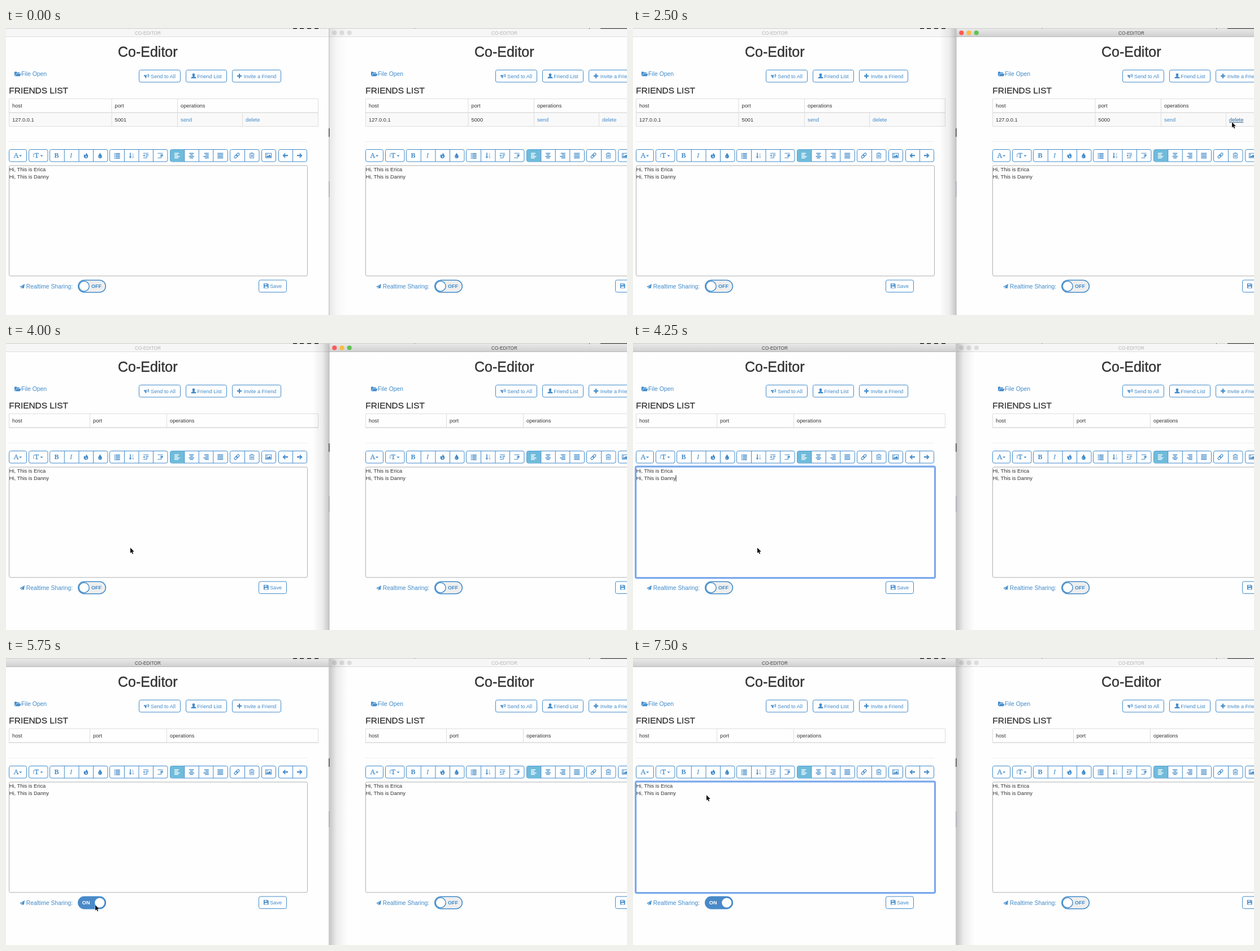
An HTML page for the animation above (8 s loop, 1099 by 509 pixels).

```html
<!DOCTYPE html>
<html lang="en">
<head>
<meta charset="utf-8">
<title>Shared editor</title>
<style>
  html, body { margin: 0; width: 100%; height: 100%; overflow: hidden; background: #fefefe; }
  svg { display: block; width: 1099px; height: 509px; font: 9.3px "Liberation Sans", Arial, sans-serif; }
  text { fill: #333; white-space: pre; }
  .blue { fill: #428bca; }
  .serif { font-family: "Liberation Serif", serif; fill: #428bca; }
  .line { fill: none; stroke: #428bca; }
</style>
</head>
<body>
<svg id="stage" viewBox="0 0 1099 509"></svg>
<script>
const LOOP = 8000, STEP = 250, SHIFT = 24, OFFSET = 631;
const BLUE = '#428bca';
const stage = document.getElementById('stage');

// Pointer stops: time, x, y
const pointer = [
  [500, 956, 145], [750, 964, 156], [1000, 976, 166], [1500, 969, 167],
  [1750, 994, 169], [2000, 1041, 168], [2250, 1060, 167],
  [3250, 930, 232], [3500, 620, 318], [3750, 310, 360], [4000, 220, 363],
  [4500, 214, 382], [4750, 184, 420], [5000, 160, 437], [5250, 158, 438],
  [6000, 151, 390], [6250, 135, 280], [6500, 130, 243]
];

const text = (x, y, s, attrs = '') => `<text x="${x}" y="${y}" ${attrs}>${s}</text>`;
const rect = (x, y, w, h, fill, attrs = '') =>
  `<rect x="${x}" y="${y}" width="${w}" height="${h}" fill="${fill}" ${attrs}/>`;
const path = (d, attrs = 'class="blue"') => `<path d="${d}" ${attrs}/>`;
const at = (x, y, body) => `<g transform="translate(${x} ${y})">${body}</g>`;
const dot = (x, y, r, fill, attrs = '') => `<circle cx="${x}" cy="${y}" r="${r}" fill="${fill}" ${attrs}/>`;
const frame = (x, y, w, h, r = 3) => rect(x, y, w, h, '#fefefe', `stroke="${BLUE}" rx="${r}"`);

// Four text lines; align: 0 left, .5 centre, 1 right
const bars = (widths, align, fill = BLUE) => widths.map((w, i) =>
  rect(-5 + (10 - w) * align, -4.6 + i * 2.7, w, 1.5, fill)).join('');
const caret = path('M0 0h5l-2.5 2.6z');
const arrow = path('M-5 0l4.2-4.2 1.2 1.2-1.9 1.9h6v2.2h-6l1.9 1.9-1.2 1.2z');
const dent = side => rect(-4.6, -4.5, 9.2, 1, BLUE) + rect(0, -1.8, 4.8, 1.4, BLUE) +
  rect(0, 1, 3.2, 1.4, BLUE) + rect(-4.6, 3.6, 7, 1, BLUE) +
  `<g transform="scale(${side} 1)">${path('M-5 0l3-2.2v4.4z')}</g>`;

const icon = {
  flame: path('M.2-5C2-3 4-1.3 3.8 1.3 3.6 3.6 2 5 0 5-2.4 5-3.9 3.3-3.9 1-3.9-.5-3-1.6-2.3-2.6c.1 1.2.3 1.8 1 2.3C-.8-1.8.7-3 .2-5z') +
    path('M.5 0c1 1.5 1.1 2.8-.2 4-1.3-.8-1.2-2 .2-4z', 'fill="#fefefe"'),
  drop: path('M0-5C1-2.4 3.4-.6 3.4 1.7 3.4 3.6 1.9 5 0 5s-3.4-1.4-3.4-3.3C-3.4-.6-1-2.4 0-5z') +
    path('M-1.5 1.5c0 1 .4 1.6 1.2 2', 'fill="none" stroke="#fefefe" stroke-width=".8"'),
  list: [-4.3, -1.6, 1.1, 3.8].map(y => rect(-5, y, 1.7, 1.6, BLUE) + rect(-2.5, y, 7.5, 1.6, BLUE)).join(''),
  order: path('M-3-5h1.5v7H0l-2.3 3L-4.6 2H-3z') +
    text(1, 0, '1', 'class="serif" font-size="6"') + text(1, 5, '9', 'class="serif" font-size="6"'),
  out: dent(1),
  into: dent(-1),
  left: bars([8, 6, 9.5, 7], 0, '#fff'),
  centre: bars([8, 5, 9.5, 6], .5),
  right: bars([8, 6, 9.5, 7], 1),
  full: bars([10, 10, 10, 10], 0),
  link: `<g transform="rotate(-45)" class="line" stroke-width="1.2"><rect x="-5.5" y="-1.9" width="6.2" height="3.8" rx="1.9"/><rect x="-.7" y="-1.9" width="6.2" height="3.8" rx="1.9"/></g>`,
  trash: path('M-4.5-3.2h9M-1.7-3.4v-1.4h3.4v1.4M-3.5-3v7.5h7V-3M-1.5-1.2v4M0-1.2v4M1.5-1.2v4', 'class="line" stroke-width=".9"'),
  image: rect(-5, -4, 10, 8, 'none', `stroke="${BLUE}"`) + dot(-2.6, -1.6, 1, BLUE) + path('M-4 3V1.6l1.6-1.5L-1 1.4 1.8-1.6 4 .6V3z'),
  prev: arrow,
  next: `<g transform="scale(-1 1)">${arrow}</g>`,
  folder: path('M0 8V1.2Q0 .3.9.3h2.6l1 1.2h3.9q.8 0 .8.8v.8H3.2L1.3 6.7z') + path('M3.6 3.9h8.2L9.6 8.3H1z'),
  horn: path('M0 2.3h3.7C6 2 7.7.7 8.6-.3v2.5c1 .3 1 1.7 0 2v2.5C7.5 5.5 6 4.5 4 4.4c-.6.7.4 1.7 1 2.3-.8 1-2 .8-2.7.4L1.6 4.4H0z') +
    path('M7.6 1.4v3.6C6.7 4.2 5.5 3.6 4.4 3.5V2.9C5.6 2.7 6.8 2.1 7.6 1.4z', 'fill="#fefefe"'),
  user: path('M4.5 0C6.2 0 7 1.2 6.8 2.7 6.7 4 6.2 4.7 5.7 5.1c.2 1.2 3.5.9 3.5 3.6H0C0 6 3.2 6.3 3.4 5.1 2.8 4.7 2.3 4 2.2 2.7 2 1.2 2.9 0 4.5 0z'),
  plus: path('M3 0h2.2v3h3v2.2h-3v3H3v-3H0V3h3z'),
  plane: path('M9 0L7.6 8 4.7 6.8 3.2 8.7V6.2L7.4 1.7 2.3 5.8 0 4.9z'),
  disk: path('M0 0h7l1.6 1.6v7H0z') + rect(1.7, .8, 4.6, 2.5, '#fefefe') + rect(1.7, 5.3, 5.2, 2.5, '#fefefe') + rect(4.2, .8, 1.2, 1.9, BLUE)
};

function toolbar() {
  const groups = [[5.5, 31], [40.5, 33.5], [77.5, 102.5], [183.5, 102.5], [290.5, 102], [396.5, 51.5], [452.5, 25], [482.5, 50]];
  const items = [[141.5, 'flame'], [166.5, 'drop'], [196.7, 'list'], [222.3, 'order'], [247.5, 'out'], [273, 'into'],
    [303, 'left'], [328.3, 'centre'], [353.8, 'right'], [379.3, 'full'], [408.5, 'link'], [435, 'trash'],
    [464.5, 'image'], [494.5, 'prev'], [519.5, 'next']];
  return groups.map(([x, w]) => frame(x, 215.5, w, 21.5)).join('') +
    path('M315.8 215.5H293.5q-3 0-3 3V234q0 3 3 3h22.3z', 'fill="#6fbbdb"') +
    path([103.3, 129, 154.5, 209.5, 235, 260.5, 315.8, 341.3, 366.8, 422.5, 507.5]
      .map(x => `M${x} 215.5v21.5`).join(''), 'class="line"') +
    text(13.5, 230.3, 'A', 'class="serif" font-size="12.5" stroke="#428bca" stroke-width=".3"') + at(23.2, 225.6, caret) +
    text(47.5, 229, 'I', 'class="serif" font-size="8"') +
    text(50.5, 230.3, 'T', 'class="serif" font-size="12.5" stroke="#428bca" stroke-width=".3"') + at(60.5, 225.6, caret) +
    text(85.5, 230, 'B', 'class="serif" font-size="12" font-weight="bold"') +
    text(113, 230, 'I', 'class="serif" font-size="12.5" font-style="italic"') +
    items.map(([x, name]) => at(x, 226.2, icon[name])).join('');
}

function table(empty, hover) {
  const [a, b] = empty ? [148.5, 284.5] : [187, 303.5];
  const bottom = empty ? 150 : 174.5;
  const grid = 'fill="none" stroke="#ddd"';
  let out = '';
  if (!empty) {
    const link = hover ? 'style="fill:#2a6496" text-decoration="underline"' : 'class="blue"';
    out = rect(5.5, 150, 547, 24.5, '#f9f9f9') + path('M418.5 150V174.5', grid) +
      text(11, 166, '127.0.0.1') + text(192.5, 166, this.port) +
      text(309, 166, 'send', 'class="blue"') + text(424, 166, 'delete', link);
  }
  return out + path(`M5.5 125.5H552.5V${bottom}H5.5zM${a} 125.5V${bottom}M${b} 125.5V${bottom}`, grid) +
    path('M5 150H553', 'stroke="#ddd" stroke-width="1.7"') +
    text(11, 141.2, 'host') + text(a + 5.5, 141.2, 'port') + text(b + 5.5, 141.2, 'operations');
}

function toggle(on) {
  return rect(127.8, 447.3, 48.6, 21.4, on ? '#4a89c8' : '#eee', `rx="10.7" stroke="${BLUE}" stroke-width="1.5"`) +
    dot(on ? 165.8 : 138.2, 458, on ? 8.6 : 9, '#fff', on ? '' : `stroke="${BLUE}" stroke-width="1.4"`) +
    (on ? text(134.8, 461.2, 'ON', 'font-size="9.2" font-weight="bold" style="fill:#fff"')
        : text(151, 461.4, 'OFF', 'font-size="9" font-weight="bold" class="blue"'));
}

function editor(w) {
  const box = w.focus
    ? rect(4.7, 243.2, 529.8, 197.5, '#fefefe', 'rx="2.5" stroke="#7aa8ec" stroke-width="3.2"')
    : rect(5.5, 244, 528, 195.8, '#fefefe', 'rx="2.5" stroke="#b0b0b0"');
  const bar = w.caret ? rect(w.caret[0], w.caret[1], 1, 11, '#333') : '';
  return path('M5 201.5H533', 'stroke="#eee"') + toolbar() + box +
    text(5.8, 254.4, 'Hi, This is Erica') + text(5.8, 267.4, 'Hi, This is Danny') + bar +
    at(24, 454, icon.plane) + text(35.8, 462.4, 'Realtime Sharing:', 'class="blue" font-size="10.35"') +
    toggle(w.on) + frame(447.5, 447, 49, 21.5) + at(456, 453, icon.disk) +
    text(467.2, 461.3, 'Save', 'class="blue" font-size="9.2"');
}

function page(w) {
  const lights = w.active ? ['#fc5b57', '#fcbc40', '#5fc454'] : Array(3).fill('#dcdcdc');
  return rect(-59, 1, 631, 508, '#fefefe') +
    rect(-59, 1, 631, 14.5, w.active ? 'url(#bar)' : '#f6f6f6') +
    rect(-59, 15, 631, 1, w.active ? '#b8b8b8' : '#dedede') +
    lights.map((c, i) => dot(-49.7 + i * 13.2, 8.6, 4.1, c)).join('') +
    text(251, 11.7, 'CO-EDITOR', `font-size="8.2" text-anchor="middle" style="fill:${w.active ? '#4a4a4a' : '#b4b4b4'}"`) +
    text(198, 51, 'Co-Editor', 'font-size="25" stroke="#333" stroke-width=".4"') +
    at(15, 77.3, icon.folder) + text(27, 85.4, 'File Open', 'class="blue" font-size="10.4"') +
    frame(235.5, 74.5, 73, 21.5) + at(244, 81.2, icon.horn) + text(256, 88.5, 'Send to All', 'class="blue" font-size="9.2"') +
    frame(318.5, 74.5, 72, 21.5) + at(327.5, 80.5, icon.user) + text(338.3, 88.5, 'Friend List', 'class="blue"') +
    frame(400.5, 74.5, 86, 21.5) + at(409, 81, icon.plus) + text(420.7, 88.5, 'Invite a Friend', 'class="blue" font-size="9.1"') +
    text(5.3, 116, 'FRIENDS LIST', 'font-size="15.45" stroke="#333" stroke-width=".3"') +
    table.call(w, w.empty, w.hover) + at(0, w.empty ? -SHIFT : 0, editor(w));
}

const defs = `<defs>
  <linearGradient id="bar" x2="0" y2="1"><stop stop-color="#e9e9e9"/><stop offset="1" stop-color="#d0d0d0"/></linearGradient>
  <linearGradient id="toRight"><stop stop-color="#000" stop-opacity=".22"/><stop offset=".4" stop-color="#000" stop-opacity=".07"/><stop offset="1" stop-color="#000" stop-opacity="0"/></linearGradient>
  <linearGradient id="toLeft" href="#toRight" x1="1" x2="0"/>
  <clipPath id="leftSide"><path d="M0 0H572V509H0z"/></clipPath>
  <clipPath id="rightSide"><path d="M572 0H1099V509H572z"/></clipPath>
</defs>`;

// Slivers of the desktop around the windows
const desktop = rect(0, 0, 1099, 1.2, '#d2d2d2') +
  [508, 520, 533, 546].map(x => rect(x, 0, 7, 1.4, '#111')).join('') +
  rect(1052, 0, 47, 1.3, '#444') + rect(723, 0, 1, 1.2, '#777') + rect(1032, 0, 1, 2, '#777');

const seam = rect(571.2, 1, 1.3, 508, '#bcbcbc') +
  rect(571.2, 178, 1.3, 15, '#333') + rect(571.2, 272, 1.3, 28, '#a3a3b5');

function caretAt(t) {
  const end = [75.6, 258.5];
  if ((t >= 4250 && t < 4750) || (t >= 5250 && t < 5750) || (t >= 6750 && t < 7000)) return end;
  return t >= 7000 && t < 7500 ? [6, 271.3] : null;
}

function draw(t) {
  const empty = t >= 2750;
  const leftOn = t >= 4250, rightOn = t >= 2250 && t < 4250;
  const left = { port: '5001', empty, active: leftOn, on: t >= 5750,
    focus: (t >= 4250 && t < 5750) || t >= 6750, caret: caretAt(t) };
  const right = { port: '5000', empty, active: rightOn, hover: t >= 2250 && !empty };
  const shadow = rightOn
    ? rect(542, 1, 30, 508, 'url(#toLeft)')
    : rect(572.5, 1, 32, 508, 'url(#toRight)', `opacity="${leftOn ? 1 : .4}"`);
  const spot = pointer.filter(p => p[0] <= t).pop();
  stage.innerHTML = defs +
    `<g clip-path="url(#leftSide)">${page(left)}</g>` +
    `<g clip-path="url(#rightSide)">${at(OFFSET, 0, page(right))}</g>` +
    shadow + seam + desktop +
    (spot ? at(spot[1], spot[2], path('M0 0V9.8L2.2 7.8 3.7 11.3 5.3 10.6 3.8 7.2 6.8 7z',
      'fill="#111" stroke="#fff" stroke-width=".9" paint-order="stroke"')) : '');
}

let shown = -1;
const start = performance.now();
function tick() {
  const step = Math.floor(((performance.now() - start) % LOOP) / STEP);
  if (step !== shown) draw((shown = step) * STEP);
  requestAnimationFrame(tick);
}
tick();
</script>
</body>
</html>
```
